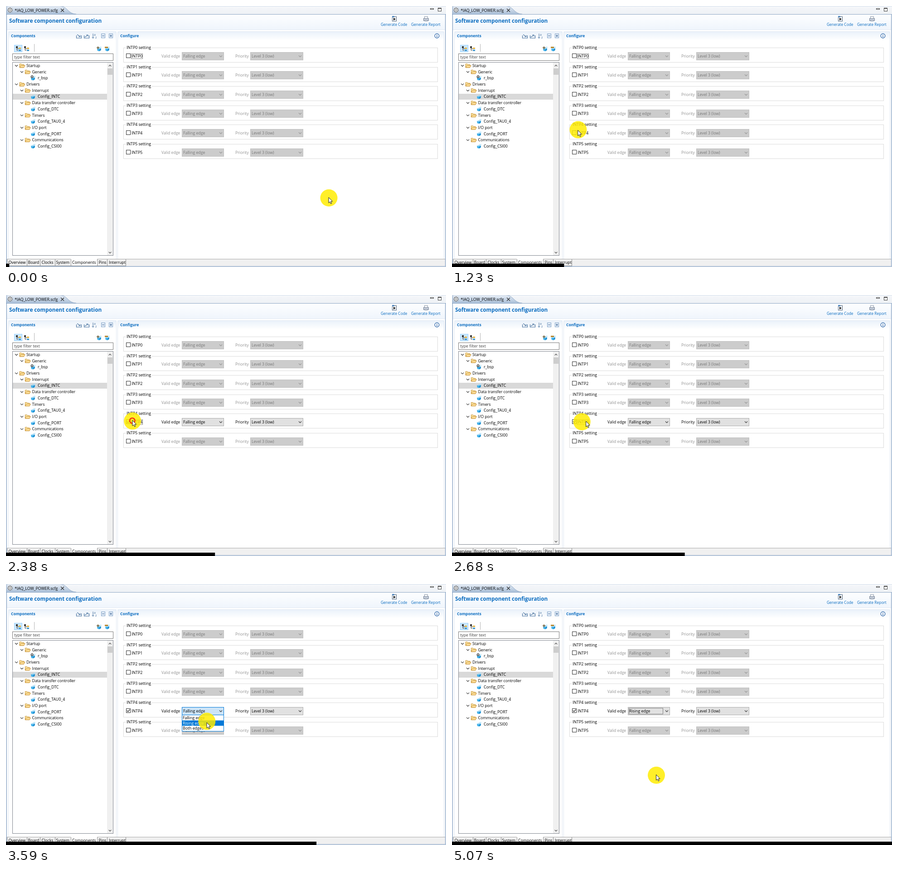
An HTML page with a canvas for the animation above (5.11 s loop, 971 by 577 pixels).

```html
<!DOCTYPE html>
<html lang="en">
<head>
<meta charset="utf-8">
<title>Software component configuration</title>
<style>
html, body { margin: 0; width: 100%; height: 100%; overflow: hidden; background: #fff; }
canvas { display: block; }
</style>
</head>
<body>
<canvas id="stage" width="971" height="577"></canvas>
<script>
const c = document.getElementById('stage').getContext('2d');
const LOOP = 5110, LAG = 45;
const ENABLE = 2140, OPEN = 2955, HOVER = 3540, CHOOSE = 3840;
const CLICKS = [2150, 2985, 3820], RING_MS = 430;
const BLUE = '#0a6cc0', LINE = '#8fa8c6', SOFT = '#d5dfeb';

// [time, x, y] of the pointer tip
const PATH = [
  [640, 712, 423], [750, 672, 422], [865, 561, 412], [910, 503, 401], [1015, 354, 362],
  [1060, 312, 340], [1100, 288, 304], [1180, 278, 272], [1320, 277, 279], [2100, 277, 279],
  [2380, 279, 277], [2600, 279, 279], [2680, 295, 279], [2800, 370, 280], [2900, 430, 280],
  [2960, 442, 280], [3300, 442, 281], [3600, 443, 307], [3880, 443, 308], [4000, 447, 325],
  [4065, 450, 355], [4110, 451, 378], [4200, 450, 412], [4280, 450.5, 421.5]
];
// [time, width] of the progress bar
const BAR = [[0, 7], [550, 112], [910, 183], [1060, 215], [1690, 334], [2380, 461],
  [3020, 573], [4110, 787], [4870, 931], [5070, 971]];

const TREE = [[0, 'Startup'], [1, 'Generic'], [2, 'r_bsp'], [0, 'Drivers'], [1, 'Interrupt'],
  [2, 'Config_INTC'], [1, 'Data transfer controller'], [2, 'Config_DTC'], [1, 'Timers'],
  [2, 'Config_TAU0_4'], [1, 'I/O port'], [2, 'Config_PORT'], [1, 'Communications'], [2, 'Config_CSI00']];
const TABS = [['Overview', 2, 5.5], ['Board', 46, 48.5], ['Clocks', 75, 78.5], ['System', 108, 110.5],
  ['Components', 143, 146], ['Pins', 201, 204.5], ['Interrupt', 223, 227]];

function along(keys, t) {
  const i = keys.findIndex(k => k[0] > t);
  if (i === 0) return keys[0].slice(1);
  if (i < 0) return keys[keys.length - 1].slice(1);
  const a = keys[i - 1], b = keys[i], f = (t - a[0]) / (b[0] - a[0]);
  return a.slice(1).map((v, j) => v + (b[j + 1] - v) * f);
}

function rect(x, y, w, h, fill, stroke) {
  if (fill) { c.fillStyle = fill; c.fillRect(x, y, w, h); }
  if (stroke) { c.lineWidth = 1; c.strokeStyle = stroke; c.strokeRect(x + .5, y + .5, w - 1, h - 1); }
}
function text(s, x, y, color = '#000', size = 8.75, weight = 400) {
  c.font = `${weight} ${size}px "Open Sans", "Noto Sans", sans-serif`;
  c.fillStyle = color;
  c.fillText(s, x, Math.round(y));
}
function poly(points, stroke, fill, width = 1) {
  c.beginPath();
  points.forEach(([x, y]) => c.lineTo(x, y));
  if (fill) { c.closePath(); c.fillStyle = fill; c.fill(); }
  if (stroke) { c.lineWidth = width; c.strokeStyle = stroke; c.stroke(); }
}
function disc(x, y, r, fill, stroke, width = 1) {
  c.beginPath();
  c.arc(x, y, r, 0, 7);
  if (fill) { c.fillStyle = fill; c.fill(); }
  if (stroke) { c.lineWidth = width; c.strokeStyle = stroke; c.stroke(); }
}
function fade(y0, y1, from, to) {
  const g = c.createLinearGradient(0, y0, 0, y1);
  g.addColorStop(0, from);
  g.addColorStop(1, to);
  return g;
}
const chevron = (x, y, color, r = 3, dir = 1) =>
  poly([[x - r, y - dir * r / 2], [x, y + dir * r / 2], [x + r, y - dir * r / 2]], color, null, 1.1);
const gray = (a, b, f) => `rgb(${Array(3).fill(Math.round(a + (b - a) * f))})`;

function focusBox(x, y, w, h) {
  c.setLineDash([1, 1]);
  rect(x, y, w, h, null, '#222');
  c.setLineDash([]);
}
function folder(x, y) {
  poly([[x, y + 4], [x, y - 4], [x + 4, y - 4], [x + 5, y - 2.5], [x + 9.5, y - 2.5], [x + 9.5, y + 4]], '#c08a2c', '#ffe9a8', .9);
  poly([[x, y + 4], [x + 2.5, y - .5], [x + 12, y - .5], [x + 9.5, y + 4]], '#c08a2c', '#ffe09a', .9);
}
// Small open box with a raised pale lid
function cube(x, y) {
  poly([[x, y - 1], [x + 5, y], [x + 5, y + 5], [x + .8, y + 4]], null, '#3fb0ea');
  poly([[x + 5, y], [x + 9, y - 1.5], [x + 8.5, y + 3], [x + 5, y + 5]], null, '#1d8fd2');
  poly([[x + 1, y - 1.5], [x + 5, y - 3], [x + 9, y - 2], [x + 5, y - .5]], null, '#8fd3f6');
  poly([[x + 4.5, y - 3.5], [x + 8, y - 5], [x + 10.5, y - 4], [x + 9, y - 2.5]], null, '#b9e3f8');
}
function gear(x, y, r, color) {
  for (let i = 0; i < 8; i++) {
    const a = i * Math.PI / 4, u = Math.cos(a), v = Math.sin(a);
    poly([[x + u * r * .7, y + v * r * .7], [x + u * r, y + v * r]], color, null, 1.6);
  }
  disc(x, y, r * .68, '#eee', color, 1.1);
  disc(x, y, r * .25, null, color, .9);
}

function drawFrame() {
  rect(0, 0, 971, 577, '#fff');
  rect(0, 0, 971, 18, fade(0, 18, '#f5f7fa', '#eef1f5'));
  c.beginPath();
  c.moveTo(1, 18);
  c.lineTo(1, 3);
  c.quadraticCurveTo(1, .5, 4, .5);
  c.lineTo(119, .5);
  c.bezierCurveTo(136, .5, 136, 17.5, 155, 18);
  c.fillStyle = fade(0, 18, '#e8eef6', '#a9bfd8');
  c.fill();
  c.lineWidth = 1;
  c.strokeStyle = LINE;
  c.stroke();
  rect(0, 0, 971, 1, SOFT);
  rect(0, 18, 971, 1, LINE);
  rect(0, 19, 1, 558, SOFT);
  rect(1, 19, 1, 558, LINE);
  rect(969, 19, 1, 558, LINE);
  rect(970, 19, 1, 558, SOFT);
  gear(9, 9, 6, '#777');
  text('*IAQ_LOW_POWER.scfg', 19, 13);
  poly([[121, 6], [128, 13]], '#333', null, 1.2);
  poly([[128, 6], [121, 13]], '#333', null, 1.2);
  rect(936, 5, 8, 3, '#fff', '#444');
  rect(953, 4, 8, 8, '#fff', '#444');
  rect(953, 4, 8, 2, '#444');

  rect(2, 19, 967, 34, fade(19, 53, '#fdfeff', '#eff5fc'));
  rect(2, 52, 967, 1, '#e2e9f3');
  text('Software component configuration', 7, 37, BLUE, 11.7, 700);
  text('Generate Code', 827, 44, BLUE, 8.4);
  text('Generate Report', 894, 44, BLUE, 8.4);
  rect(852, 23, 10, 11, '#f4f7fb', '#55667a');
  rect(852, 22, 5, 3, '#5589bd');
  poly([[855, 26], [860, 29], [855, 32]], null, '#222');
  rect(923, 23, 8, 5, '#fff', '#8b97a8');
  rect(921, 27, 12, 6, '#c6cedb', '#7d899b');
  rect(924, 31, 6, 3, '#fff', '#8b97a8');

  for (const [x, w] of [[5, 239], [246, 721]]) {
    rect(x, 56, w, 20, fade(56, 76, '#e9f1fa', '#fff'));
    c.beginPath();
    c.roundRect(x + .5, 56.5, w - 1, 503, [4, 4, 0, 0]);
    c.strokeStyle = '#e0e8f2';
    c.lineWidth = 1;
    c.stroke();
  }
  text('Components', 11, 69, BLUE, 8.5, 700);
  text('Configure', 252, 69, BLUE, 8.5, 700);
  disc(951, 66, 4.8, '#fff', '#245fa5', 1.2);
  rect(950.4, 65, 1.3, 4, '#245fa5');
  rect(950.4, 63, 1.3, 1.3, '#245fa5');
}

function drawToolbar() {
  const ink = '#49739f';
  for (const [x, d] of [[161, 1], [178, -1]]) {
    poly([[x - 5.5, 65], [x - 5.5, 71], [x + 5.5, 71], [x + 5.5, 65]], ink, null, 1.2);
    poly([[x - 4, 66 - d * 3], [x + 3, 66 + d * 2]], ink, null, 1.1);
    poly([[x + 3, 66 - d * 1.5], [x + 3, 66 + d * 2], [x - 1, 66 + d * 2]], ink, null, 1);
  }
  poly([[192, 61], [192, 71]], ink);
  poly([[190, 69], [192, 71.5], [194, 69]], ink);
  text('a', 194, 66, ink, 7);
  text('z', 197, 72, ink, 7);
  for (const x of [214, 231]) {
    rect(x - 4, 61, 9, 10, '#eaf2fb', '#7d9fc4');
    rect(x - 2, 65.5, 5, 1, '#1f4f86');
  }
  rect(231, 63.5, 1, 5, '#1f4f86');

  rect(18, 86, 18, 16, '#cce8ff', '#99d1ff');
  for (const x of [22, 40]) {
    rect(x, 89, 4, 4, '#333');
    poly([[x + 2, 93], [x + 2, 98], [x + 5, 98]], '#444');
    poly([[x + 2, 94.5], [x + 6, 94.5]], '#444');
    rect(x + 6, 92, 5, 3, '#e2b23e');
    rect(x + 6, 96.5, 5, 3, '#338fc9');
  }
  rect(62, 84, 1, 17, '#b5b5b5');
  cube(201, 95);
  cube(219, 95);
  rect(200, 91.5, 6, 1.6, '#6b5a32');
  rect(202.2, 89.3, 1.6, 6, '#6b5a32');
  rect(218, 90, 7, 3, '#b8862f');

  rect(14, 105, 223, 16, '#fff', '#7a7a7a');
  text('type filter text', 18, 116, '#444');
}

function drawTree() {
  rect(14, 124, 223, 428, '#fff', '#828790');
  rect(223, 125, 13, 426, '#f0f0f0');
  rect(224, 138, 11, 14, '#cdcdcd');
  chevron(229.5, 132, '#444', 2.8, -1);
  chevron(229.5, 545, '#444', 2.8);
  rect(15, 194, 208, 13, '#d9d9d9');
  TREE.forEach(([level, label], i) => {
    const y = 132 + 13.69 * i;
    if (level < 2) {
      chevron(23 + 12 * level, y, '#333', 3);
      folder(30 + 12.3 * level, y);
    } else {
      cube(55, y);
    }
    if (label === 'r_bsp') disc(57.5, y - 3, 2.3, '#ddd', '#333', 1.2);
    text(label, 45 + 12.5 * level, y + 3);
  });
}

function drawTabs() {
  rect(2, 559, 967, 16, '#f0f0f0');
  rect(2, 559, 967, 1, '#a9a9a9');
  for (const [label, x, tx] of TABS) {
    if (label === 'Components') rect(x, 559, 58, 15, '#fff');
    rect(x, 560, 1, 14, '#8e8e8e');
    text(label, tx, 570);
  }
  rect(264, 560, 1, 14, '#8e8e8e');
  rect(2, 574, 263, 1, '#8e8e8e');
  rect(0, 575, 971, 1, LINE);
  rect(0, 576, 971, 1, SOFT);
}

function select(x, y, w, label, on, open) {
  rect(x, y - 9, w, 18, open ? '#cce4f7' : gray(204, 225, on), open ? '#0078d7' : gray(191, 173, on));
  text(label, x + 3, y + 3, gray(120, 0, on));
  chevron(x + w - 7, y, gray(150, 60, on), 3);
}

function drawGroup(i, t) {
  const dy = 42.6 * i, top = Math.round(92 + dy), y = Math.round(110.5 + dy);
  const active = i === 4, on = active ? Math.min(1, Math.max(0, (t - ENABLE) / 100)) : 0;
  const opened = active && t >= OPEN && t < CHOOSE, chosen = active && t >= CHOOSE;
  rect(259, top, 694, 33, null, '#dcdcdc');
  rect(264, top - 2, 58, 4, '#fff');
  text(`INTP${i} setting`, 266, top + 3.4);
  rect(265, y - 6, 10, 10, '#fff', '#333');
  if (on) poly([[267, y - 1.2], [269.2, y + 1.3], [273.2, y - 3.6]], '#222', null, 1.3);
  text(`INTP${i}`, 277, y + 3);
  if (i === 0 && t < ENABLE || active && t >= ENABLE && t < OPEN) focusBox(276, y - 6, 26, 12);
  text('Valid edge', 343, y + 3, gray(145, 0, on), 8.6);
  text('Priority', 506, y + 3, gray(145, 0, on));
  select(388, y, 93, chosen ? 'Rising edge' : 'Falling edge', on, opened);
  select(539, y, 117, 'Level 3 (low)', on, false);
  if (chosen) focusBox(390, y - 7, 76, 14);
}

function drawList(t) {
  rect(388, 289, 93, 37, '#fff', '#0078d7');
  const picked = t < HOVER ? 0 : 1;
  ['Falling edge', 'Rising edge', 'Both edges'].forEach((label, i) => {
    const y = 290 + 11.6 * i;
    if (i === picked) rect(389, y, 91, 11.8, '#0078d7');
    text(label, 390, y + 9.2, i === picked ? '#fff' : '#000');
  });
}

function drawPointer(t) {
  const [hx, hy] = along(PATH, t - LAG), [x, y] = along(PATH, t);
  disc(hx + .5, hy + 1.3, 19, 'rgba(255,236,0,.84)');
  for (const start of CLICKS) {
    const age = (t - start) / RING_MS;
    if (age >= 0 && age < 1) disc(hx, hy + .5, 12.5 * (1 - age), null, '#f5350f', 2.6);
  }
  const arrow = [[0, 0], [0, 12.3], [2.8, 9.8], [4.8, 14.2], [6.7, 13.3], [4.8, 9], [8.6, 9]];
  poly([...arrow, arrow[0]].map(([px, py]) => [x + px, y + py]), '#222', '#fff', 1);
}

function draw(now) {
  const t = now % LOOP;
  drawFrame();
  drawToolbar();
  drawTree();
  drawTabs();
  for (let i = 0; i < 6; i++) drawGroup(i, t);
  if (t >= OPEN && t < CHOOSE) drawList(t);
  drawPointer(t);
  rect(0, 569.6, along(BAR, t)[0], 7.4, '#000');
}

const begin = performance.now();
function tick() {
  draw(performance.now() - begin);
  requestAnimationFrame(tick);
}
tick();
</script>
</body>
</html>
```
